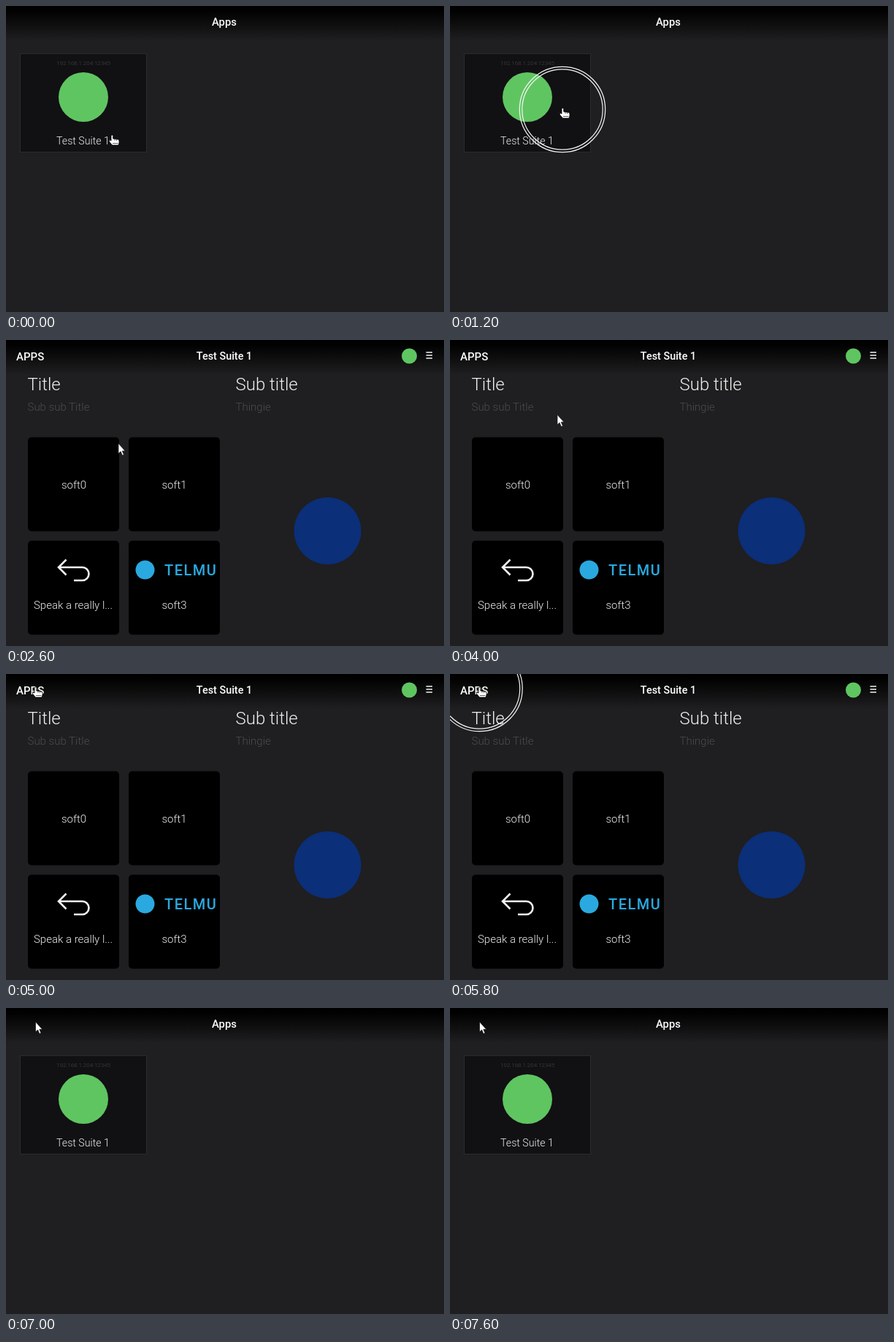
Write an HTML page that moves like this. It is 600x420 px and loops after 9.6 s.

```html
<!DOCTYPE html>
<html lang="en">
<head>
<meta charset="utf-8">
<title>Apps</title>
<style>
  html, body { margin: 0; width: 100%; height: 100%; overflow: hidden; background: #1f1e20; }
  svg { display: block; width: 600px; height: 420px; }
  text { font-family: Roboto, "Open Sans", sans-serif; font-weight: 300; font-size: 15px; fill: #f0f0f0; }
  .mid { text-anchor: middle; }
  .bar { font-weight: 500; fill: #fff; }
  .big { font-size: 24px; }
  .dim { fill: #4c4b4e; }
  .tile { fill: #000; }
  .line { fill: none; stroke: #f4f4f4; }
</style>
</head>
<body>
<svg viewBox="0 0 600 420">
  <defs>
    <linearGradient id="shade" x1="0" y1="0" x2="0" y2="1">
      <stop offset="0" stop-color="#000"/>
      <stop offset=".15" stop-color="#020202"/>
      <stop offset="1" stop-color="#1f1e20"/>
    </linearGradient>
    <clipPath id="loaded"><rect id="loadedBox" x="300" y="200" width="300" height="120"/></clipPath>
  </defs>
  <rect width="600" height="420" fill="#1f1e20"/>
  <rect width="600" height="48" fill="url(#shade)"/>

  <g id="list">
    <text class="bar mid" x="299" y="27" style="font-size:14.8px">Apps</text>
    <rect x="19.5" y="65.5" width="173" height="135" fill="#111013" stroke="#2b2a2d"/>
    <text class="mid" x="106" y="81" style="font-size:8px;fill:#454447">192.168.1.204:12345</text>
    <circle cx="106" cy="125" r="34" fill="#5fc561"/>
    <text class="mid" x="105.5" y="190" style="font-size:14.2px">Test Suite 1</text>
  </g>

  <g id="detail">
    <text class="bar" x="14" y="27.5">APPS</text>
    <text class="bar mid" x="299" y="27" style="font-size:14.4px">Test Suite 1</text>
    <circle cx="552.5" cy="22" r="10.5" fill="#5fc561"/>
    <path class="line" stroke-width="1.6" d="M575.5 17h8.5M575.5 21h8.5M575.5 25h8.5"/>
    <text class="big" x="29.5" y="69">Title</text>
    <text class="big" x="314.5" y="69">Sub title</text>
    <text class="dim" x="29.5" y="97">Sub sub Title</text>
    <text class="dim" x="314.5" y="97">Thingie</text>
    <rect class="tile" x="30" y="133.500" width="125" height="129" rx="5"/>
    <rect class="tile" x="168" y="133.500" width="125" height="129" rx="5"/>
    <rect class="tile" x="30" y="275.500" width="125" height="129" rx="5"/>
    <rect class="tile" x="168" y="275.500" width="125" height="129" rx="5"/>
    <text class="mid" x="93" y="204">soft0</text>
    <text class="mid" x="230.500" y="204">soft1</text>
    <path class="line" stroke-width="2.6" d="M82.500 301.500L72 312L82.500 322.500M72 312H104.500A9 9 0 0 1 104.500 330H93"/>
    <text class="mid" x="92" y="369">Speak a really l...</text>
    <circle cx="190.500" cy="315.500" r="13" fill="#2aa9e0"/>
    <text x="217" y="323" style="font-size:20px;font-weight:500;letter-spacing:1.500px;fill:#2aa9e0">TELMU</text>
    <text class="mid" x="230.500" y="369">soft3</text>
    <circle cx="440.500" cy="262" r="46" fill="#0b2f78" clip-path="url(#loaded)"/>
  </g>

  <g id="ring" class="line" stroke-width="1.2">
    <circle r="58.700"/>
    <circle r="55.200"/>
  </g>
  <g id="hand">
    <path fill="#fff" stroke="#000" stroke-width=".8" d="M3 1.500Q3 0 4.300 0T5.700 1.500V5L12.500 6.200Q14 6.500 14 8V11L13 14H4.500L.7 9.500Q-.4 7.400 1 6.800L3 8Z"/>
    <path stroke="#222" stroke-width=".7" d="M8 5.800V8M10.500 6.200V8.200M5 11.500H12.500"/>
  </g>
  <path id="arrow" fill="#fff" stroke="#111" stroke-width=".7" d="M0 0V13.800L3.100 11L5.300 16.300L7.500 15.400L5.300 10.300H9.200Z"/>
</svg>
<script>
  const LOOP = 9600;
  const el = id => document.getElementById(id);

  // start time, pointer shape, x, y
  const pointer = [
    [0, "hand", 141, 177],
    [200, "hand", 138, 150],
    [400, "hand", 150, 140],
    [1600, "arrow", 154, 142],
    [3800, "arrow", 156, 139.5],
    [4000, "arrow", 147, 102.5],
    [4200, "arrow", 118, 62.5],
    [4400, "hand", 34, 17.5],
    [4600, "hand", 36, 18],
    [7000, "arrow", 40.5, 19]
  ];
  // start time, end time, centre of the press ring
  const presses = [
    [600, 1600, 154, 142],
    [5800, 7000, 40.5, 20]
  ];

  const show = (id, on) => el(id).setAttribute("visibility", on ? "visible" : "hidden");
  const place = (id, x, y) => el(id).setAttribute("transform", `translate(${x} ${y})`);

  function draw(t) {
    const inside = t >= 1600 && t < 7000;
    show("list", !inside);
    show("detail", inside);
    el("loadedBox").setAttribute("height", t < 1800 ? 71 : 120);

    const [, shape, x, y] = pointer.filter(step => step[0] <= t).pop();
    show("hand", shape === "hand");
    show("arrow", shape === "arrow");
    place(shape, x, y);

    const press = presses.find(p => t >= p[0] && t < p[1]);
    show("ring", press);
    if (press) place("ring", press[2], press[3]);
  }

  const start = performance.now();
  function tick() {
    draw((performance.now() - start) % LOOP);
    requestAnimationFrame(tick);
  }
  tick();
</script>
</body>
</html>
```
